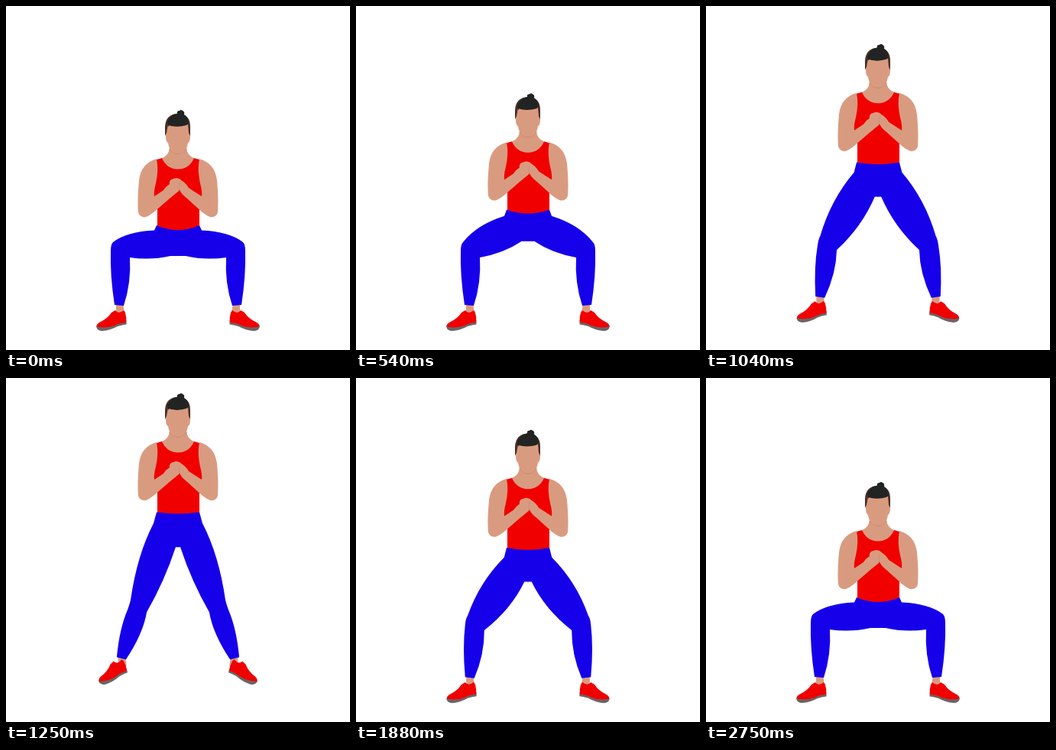
An HTML page that plays this animation: 450x450 px, repeating every 2790 ms.

```html
<!DOCTYPE html>
<html lang="en">
<head>
<meta charset="utf-8">
<title>Squat jump</title>
<style>
  html, body { margin: 0; height: 100%; overflow: hidden; background: #fff; }
  svg { display: block; width: 100vw; height: 100vh; }
  .skin { fill: #d99b80; }
  .red { fill: #f10000; }
</style>
</head>
<body>
<svg viewBox="0 0 450 450">
  <g id="torso">
    <path class="skin" d="M197 201Q214 198 214 184H236Q236 198 253 201L246 217H204Z"/>
    <path class="red" d="M197 201L204 199Q210 213 225 213.500Q240 213 246 199L253 201L258 250L253 264V298H198V264L192 250Z"/>
    <path class="skin" d="M197 200C183 204 176 213 174 228C172.500 245 172 257 173 270Q175 277 183 276Q188 274 193 270L215 251L226 242L231 231Q229 225 222 225L216 227Q213 230 214 233Q209 236 206 241L194 249Q193 243 196 232Q200 214 197 200Z"/>
    <path class="skin" d="M253 200C267 204 274 213 276 228C277.500 245 278 257 277 270Q275 277 267 276Q262 274 257 270L236 251Q228 245 226 238Q225 231 229 228Q235 231 239 238L256 249Q257 243 254 232Q250 214 253 200Z"/>
    <path d="M227 241Q225 234 228 230" fill="none" stroke="#c98a70" stroke-width=".7"/>
    <path d="M213 187Q225 201 237 187Z" fill="#c88870"/>
    <path class="skin" d="M210 151H240L241 170Q241 178 238 179Q236 193 225 193Q214 193 212 179Q209 178 209 170Z"/>
    <path d="M208 170V158Q209 141 225 141Q241 141 241 158V170L239 166L238 155H212L210 166Z" fill="#4a3028"/>
    <path d="M211 152Q215 142 224 140.500Q223 137 227 137Q229 135 231 137Q234 138 233 142Q238 145 239 153L236 156Q226 159 216 157Q213 155 212 158Z" fill="#222423"/>
  </g>
  <g id="leg">
    <path id="ankle" class="skin" d="M144 388H153L155 403H144Z"/>
    <g id="shoe">
      <path d="M118 419Q119 425 126 425Q136 424.500 146 419Q152 417 157.500 416.500V411L120 416Z" fill="#6b6464"/>
      <path class="red" d="M143 398Q147 404 154 398L156 401Q158 408 157 414Q148 414.500 142 418Q133 422 119 419.500Q117.500 417 122 414Q133 409 138 401Z"/>
    </g>
    <path id="pants" fill="#1600ea"/>
  </g>
  <use href="#leg" transform="matrix(-1 0 0 1 450 0)"/>
</svg>
<script>
const LOOP = 2790, START = 130, STEP = 41.6;
const STRETCH = 93.5, JUMP = 29;

const el = id => document.getElementById(id);
const clamp = x => Math.min(1, Math.max(0, x));
const ease = x => Math.sin(clamp(x) * Math.PI / 2) ** 2;

// Legs straighten, then bend again
const stretchAt = t => STRETCH * Math.min(ease((t - START) / 1300), ease((2680 - t) / 1230));
// Ballistic hop around the top
const liftAt = t => JUMP * clamp(1 - ((t - 1375) / 424) ** 2);

// s raises the hips; k pulls the knee inward once the leg is nearly straight
function pantsPath(s, k) {
  const middle = 293 - 0.995 * s;
  const waist = `197 ${287 - 0.95 * s}`;
  return `M${waist} L${194 - k} ${293.5 - 0.86 * s}
    Q${158 + 14 * k} ${295 - 0.41 * s} ${140 + 24 * k} ${309 + 8 * k}
    Q${137 + 26 * k} ${312 + 10 * k} ${137 + 23 * k} ${320 + 10 * k}
    Q${136 + 13 * k} ${352 + 2 * k} ${142 + 3 * k} ${391 + k}
    L${154 + 3 * k} ${392 + 3 * k}
    Q${164 + 16 * k} ${362 - k} ${162 + 23 * k} ${329 + 4 * k}
    Q${189 + 0.2 * s} ${333 - 0.44 * s} ${215 + 0.078 * s} ${327 - 0.885 * s}
    H225.5 V${middle} H225 Q211 ${middle} ${waist}Z`;
}

function draw() {
  const now = performance.now() % LOOP;
  const t = START + Math.floor((now - START) / STEP + 0.2) * STEP;
  const s = stretchAt(t), lift = liftAt(t);
  const k = (s / 90) ** 5, tip = k * k;
  el("torso").setAttribute("transform", `translate(0 ${-s - lift})`);
  el("leg").setAttribute("transform", `translate(0 ${-lift})`);
  el("ankle").setAttribute("transform", `translate(${3 * tip} 0)`);
  el("shoe").setAttribute("transform", `translate(${4 * tip} ${4 * tip}) rotate(${-14 * tip} 120 422)`);
  el("pants").setAttribute("d", pantsPath(s, k));
  requestAnimationFrame(draw);
}
draw();
</script>
</body>
</html>
```
